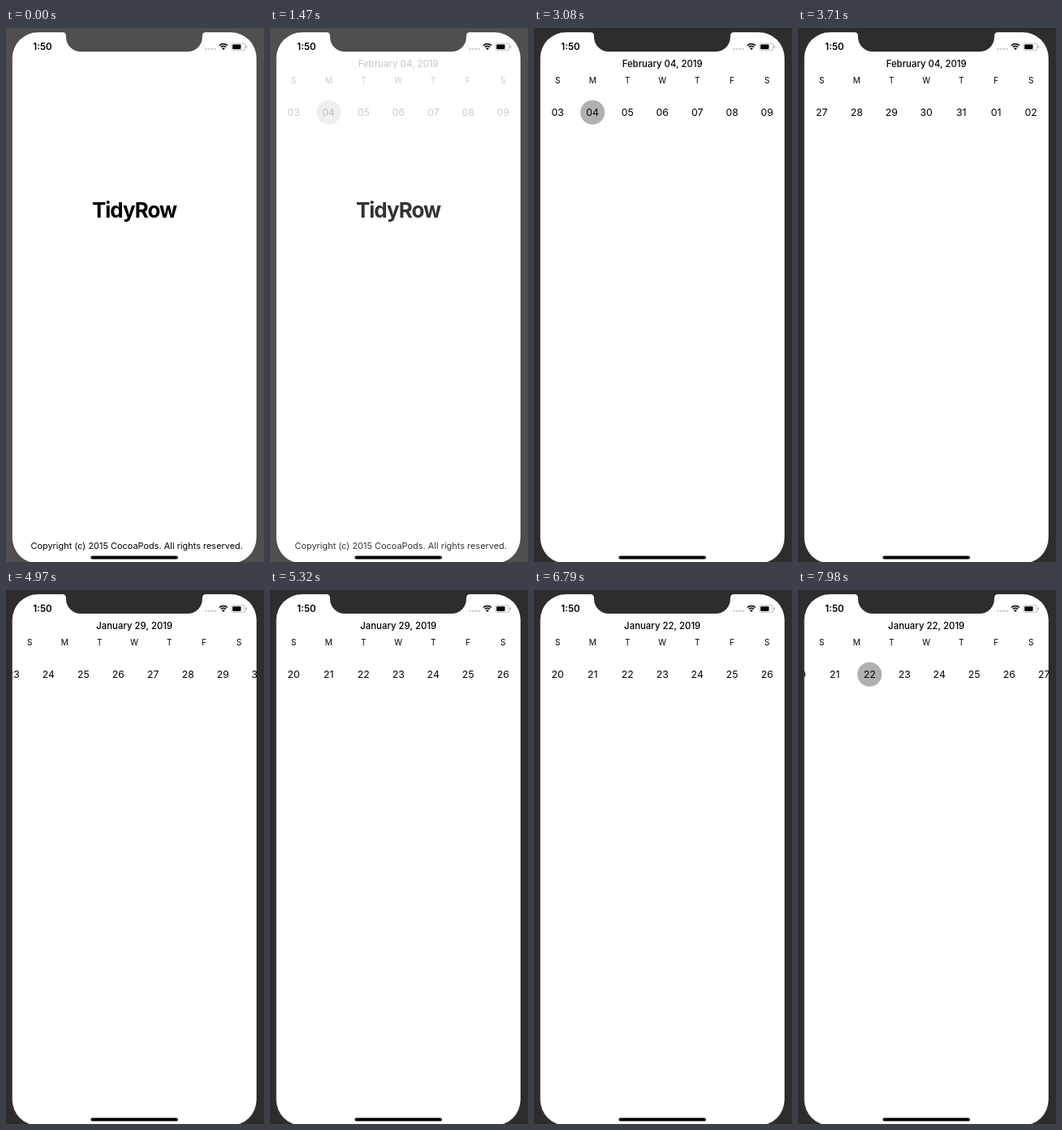
Animation of 318 by 656 pixels, one loop 8000 ms. Source, as an HTML page with a canvas:

```html
<!DOCTYPE html>
<html lang="en">
<head>
<meta charset="utf-8">
<title>Week calendar</title>
<style>
  html, body { margin: 0; width: 100%; height: 100%; overflow: hidden; background: #2d2d2d; }
  canvas { display: block; width: 318px; height: 656px; }
</style>
</head>
<body>
<canvas id="stage" width="318" height="656"></canvas>
<script>
const ctx = document.getElementById('stage').getContext('2d');
const LOOP = 8000, TICK = 70;
const CELL = 43, PAGE = CELL * 7, FIRST_X = 29.2;
const BOUNCE = [0, 89, 95, 80, 52, 31, 8, 0];

// The day offsets below count from Sunday, 3 February 2019.
const dayDate = offset => new Date(2019, 1, 3 + offset);

// Number of ticks done, from 0 to count, in a move that begins at start.
const ticks = (t, start, count) =>
  Math.max(0, Math.min(count, Math.floor((t - start) / TICK) + 1));

const easeOut = (p, power) => 1 - Math.pow(1 - p, power);

function scrollAt(t) {
  return PAGE * easeOut(ticks(t, 3290, 7) / 7, 2.4)
    + PAGE * easeOut(ticks(t, 4970, 6) / 6, 3.86)
    + BOUNCE[ticks(t, 6370, 7)]
    - 27 * ticks(t, 7980, 1);
}

function markedDay(t) {
  if (t < 3290) return 1;
  if (t >= 4270 && t < 4970) return -5;
  if ((t >= 5740 && t < 6370) || t >= 7140) return -12;
  return null;
}

function titleAt(t) {
  const date = dayDate(t < 4270 ? 1 : t < 5740 ? -5 : -12);
  const month = date.getMonth() ? 'February' : 'January';
  return `${month} ${String(date.getDate()).padStart(2, '0')}, 2019`;
}

function text(value, x, y, size, weight = 400, spacing = 0) {
  ctx.font = `${weight} ${size}px Inter, "Liberation Sans", sans-serif`;
  ctx.letterSpacing = spacing + 'px';
  ctx.textAlign = 'center';
  ctx.fillStyle = '#000';
  ctx.fillText(value, x, y);
}

function box(x, y, w, h, r, color) {
  ctx.beginPath();
  ctx.roundRect(x, y, w, h, r);
  ctx.fillStyle = color;
  ctx.fill();
}

function disc(x, y, r, color) {
  ctx.beginPath();
  ctx.arc(x, y, r, 0, Math.PI * 2);
  ctx.fillStyle = color;
  ctx.fill();
}

function drawBody(color) {
  ctx.fillStyle = color;
  ctx.fillRect(0, 0, 318, 656);
  box(7.5, 5, 301.5, 653, 32, '#fff');
  ctx.strokeStyle = 'rgba(0,0,0,.35)';
  ctx.lineWidth = 1;
  ctx.stroke();

  // Notch
  ctx.beginPath();
  ctx.moveTo(69, 4);
  ctx.lineTo(69, 5);
  ctx.quadraticCurveTo(74, 5, 74, 10);
  ctx.arcTo(74, 29, 92, 29, 18);
  ctx.arcTo(242, 29, 242, 11, 18);
  ctx.lineTo(242, 10);
  ctx.quadraticCurveTo(242, 5, 247, 5);
  ctx.lineTo(247, 4);
  ctx.fillStyle = color;
  ctx.fill();
}

function drawStatus() {
  text('1:50', 45, 27.2, 11.6, 600);
  for (let i = 0; i < 4; i++) disc(246.7 + i * 3.7, 25.8, 1.2, '#c4c4c4');

  // Wi-Fi
  ctx.strokeStyle = '#000';
  ctx.lineWidth = 1.6;
  for (const r of [4.3, 7]) {
    ctx.beginPath();
    ctx.arc(268, 26.5, r, -Math.PI * 0.75, -Math.PI * 0.25);
    ctx.stroke();
  }
  ctx.beginPath();
  ctx.moveTo(268, 27);
  ctx.arc(268, 27, 2.7, -Math.PI * 0.75, -Math.PI * 0.25);
  ctx.fillStyle = '#000';
  ctx.fill();

  // Battery
  ctx.beginPath();
  ctx.roundRect(277.9, 18.9, 17, 8.4, 2.2);
  ctx.strokeStyle = '#a8a8a8';
  ctx.lineWidth = 0.8;
  ctx.stroke();
  box(279.2, 20.2, 10.3, 5.8, 1, '#000');
  box(295.7, 21.7, 1.1, 2.8, 0.5, '#a8a8a8');
}

function drawSplash() {
  text('TidyRow', 158, 232.8, 26, 700, -1);
  text('Copyright (c) 2015 CocoaPods. All rights reserved.', 161.2, 640, 10.95);
}

function drawCalendar(t) {
  text(titleAt(t), 158.2, 48.1, 11.4, 500);
  [...'SMTWTFS'].forEach((day, i) => text(day, FIRST_X + i * CELL, 68.2, 10));

  ctx.save();
  ctx.beginPath();
  ctx.rect(7.5, 80, 301.5, 50);
  ctx.clip();
  const shift = scrollAt(t), marked = markedDay(t);
  const first = Math.floor(-shift / CELL) - 1;
  for (let day = first; day < first + 10; day++) {
    const x = FIRST_X + day * CELL + shift;
    if (day === marked) disc(x, 103.7, 15, '#b0b0b0');
    text(String(dayDate(day).getDate()).padStart(2, '0'), x, 108, 12.3);
  }
  ctx.restore();
}

function draw(t) {
  const fade = ticks(t, 1470, 5) / 5;
  drawBody(t < 3080 ? '#4f4f4f' : '#2d2d2d');
  drawStatus();
  ctx.globalAlpha = 1 - fade;
  if (fade < 1) drawSplash();
  ctx.globalAlpha = fade;
  if (fade > 0) drawCalendar(t);
  ctx.globalAlpha = 1;
  box(104.5, 648.6, 107.5, 3.8, 1.9, '#000');
}

const start = performance.now();
function frame() {
  draw((performance.now() - start) % LOOP);
  requestAnimationFrame(frame);
}
frame();
</script>
</body>
</html>
```
